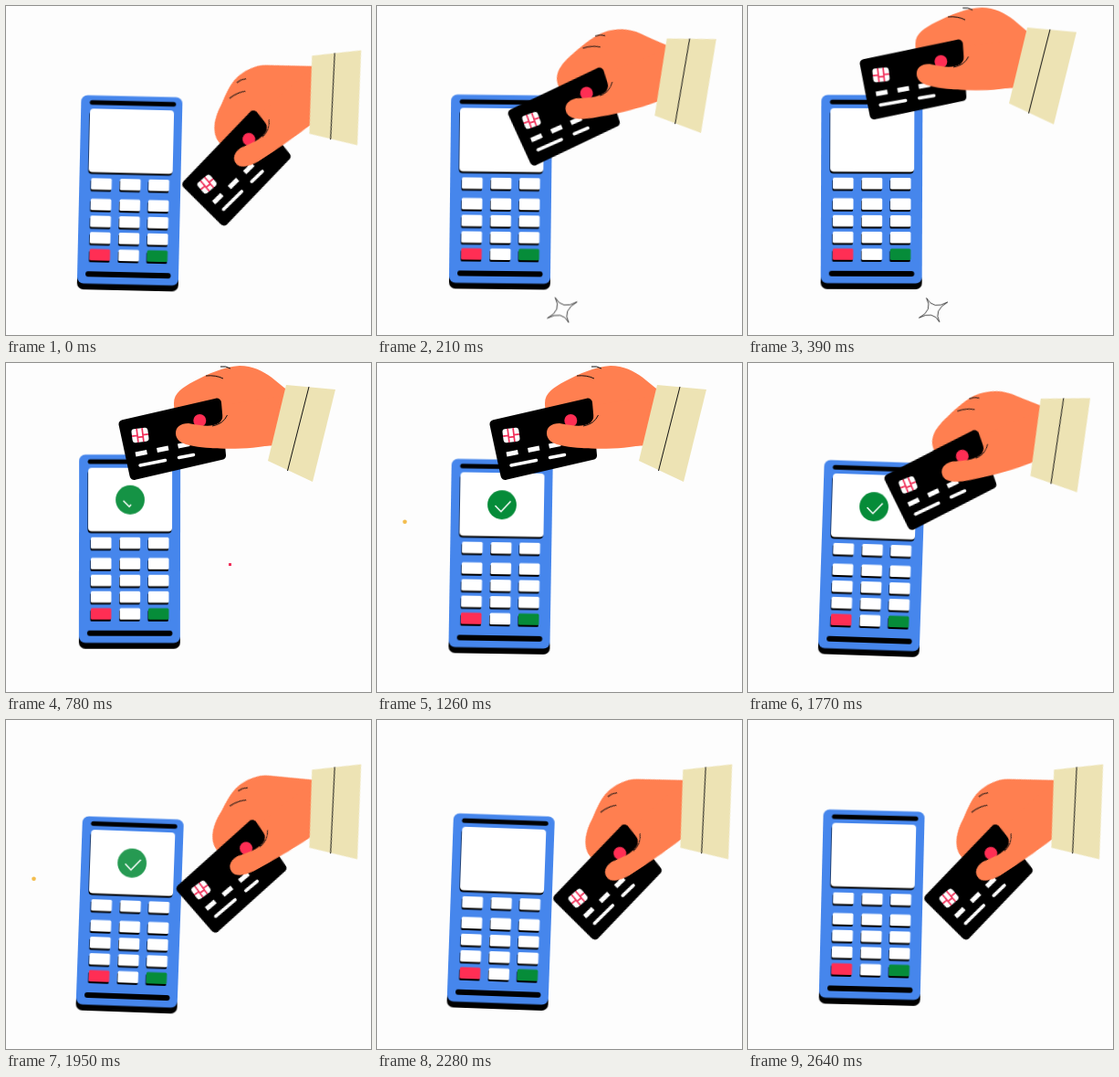
Recreate the animation shown at these times as an HTML page. Size 400 by 360 pixels, loop 2.67 s.

```html
<!DOCTYPE html>
<html lang="en">
<head>
<meta charset="utf-8">
<title>Card payment</title>
<style>
  html, body { margin: 0; width: 100%; height: 100%; overflow: hidden; background: #fdfdfd; }
  svg { display: block; width: 100%; height: 100%; }

  g, path, circle, rect {
    animation-duration: 2670ms;
    animation-iteration-count: infinite;
    animation-timing-function: cubic-bezier(.37, 0, .63, 1);
  }

  /* terminal: slow bob and sway, slightly out of phase */
  .bob { animation-name: bob; animation-delay: -2370ms; }
  .sway { animation-name: sway; animation-delay: -2070ms; transform-origin: 136px 210px; }
  @keyframes bob {
    0%, 100% { transform: translateY(-2.2px); animation-timing-function: cubic-bezier(.36, 0, .6, 1); }
    52.4% { transform: translateY(8.3px); animation-timing-function: cubic-bezier(.45, 0, .63, 1); }
  }
  @keyframes sway {
    0%, 100% { transform: rotate(0deg); }
    52.4%, 61.8% { transform: rotate(2.05deg); }
  }

  /* approval mark */
  .ok { animation-name: ok; }
  .tick { stroke-dasharray: 1 2; animation-name: tick; }
  @keyframes ok {
    0%, 22.5% { opacity: 0; }
    30.5%, 71% { opacity: 1; }
    80%, 100% { opacity: 0; }
  }
  @keyframes tick {
    0%, 24% { stroke-dashoffset: 1.1; }
    34%, 100% { stroke-dashoffset: 0; }
  }

  /* arm */
  .sleeve { animation-name: sleeve; transform-origin: 322.75px 72.5px; }
  .hand { animation-name: hand; transform-origin: 298px 66px; }
  .palm { animation-name: palm; }
  .thumb { animation-name: thumb; }
  @keyframes sleeve {
    0%, 73%, 100% { transform: translate(37.75px, 26.25px) rotate(-11.6deg); }
    14%, 59.5% { transform: translate(-1px, -.5px); }
    28%, 48% { transform: none; }
  }
  @keyframes hand {
    0%, 85%, 100% { transform: translate(41.5px, 35.4px) rotate(-33.2deg); }
    14%, 59.5% { transform: translate(-1px, -.5px) rotate(1.2deg); }
    28%, 48% { transform: translate(0, 0) rotate(0deg); }
    73% { transform: translate(41.5px, 35.4px) rotate(-29deg); }
  }
  @keyframes palm {
    0%, 73%, 100% { d: path("M320 38C304 27 288 16 272 5C263 -1 248 -3 235 0C227 2 218 8 209 14C198 20 184 30 183 45C183 52 187 60 192 66L260 86L300 84Z"); }
    14%, 59.5% { d: path("M318 36C309 31 300 23 291 15.7C282 9 270 3 256 3C238 4 222 12 206 20C193 27 184 33 184 44C184 52 186 60 192 66L260 92L300 90Z"); }
  }
  @keyframes thumb {
    0%, 73%, 100% { d: path("M186 77C186 70 191 66 200 66C212 68 224 71 233 66C239 62 238 54 239 46L312 35L300 84C270 89 230 89 208 89C194 88 186 84 186 77Z"); }
    14%, 59.5% { d: path("M186 77C186 70 191 66 200 66C212 68 224 71 233 66C239 62 238 54 239 46L300 36L292 89C270 95 230 95 206 91C192 89 186 84 186 77Z"); }
  }

  /* sparkles */
  .star { animation-name: star; }
  .red { animation-name: red; transform-origin: 245.5px 220.5px; }
  .gold { animation-name: gold; transform-origin: 30.5px 173.7px; }
  @keyframes star {
    0%, 3% { transform: scale(0); }
    11% { transform: scale(1.15); }
    20%, 100% { transform: scale(0); }
  }
  @keyframes red {
    0%, 25% { transform: scale(0); }
    28.5%, 30% { transform: scale(1); }
    34%, 100% { transform: scale(0); }
  }
  @keyframes gold {
    0%, 36%, 54%, 67%, 80%, 100% { transform: scale(0); }
    42%, 48%, 72%, 75% { transform: scale(1); }
  }
</style>
</head>
<body>
<svg viewBox="0 0 400 360">
  <g class="bob"><g class="sway">
    <rect x="80" y="106" width="111" height="206" rx="7"/>
    <rect x="80" y="99.5" width="111" height="206" rx="7" fill="#4686ec"/>
    <path d="M92 107.3H181.5" stroke="#000" stroke-width="5" stroke-linecap="round"/>
    <path d="M92 295H179.5" stroke="#000" stroke-width="6" stroke-linecap="round"/>
    <rect x="89.5" y="116.5" width="92" height="69" rx="4"/>
    <rect x="90" y="114" width="92" height="69.5" rx="4" fill="#fff"/>
    <g id="keys"></g>
    <g class="ok">
      <circle cx="136" cy="149" r="15.9" fill="#068c39"/>
      <path class="tick" pathLength="1" d="M128.5 150L135 156.5L145.5 145" fill="none" stroke="#fff" stroke-width="1.5"/>
    </g>
  </g></g>

  <g transform="translate(203 333)">
    <path class="star" d="M-10 -18Q0 0 21 -12Q0 0 9 17Q0 0 -21 11Q0 0 -10 -18Z" fill="none" stroke="#111"/>
  </g>
  <rect class="red" x="244" y="219" width="3" height="3" fill="#f0305a"/>
  <circle class="gold" cx="30.5" cy="173.7" r="2.3" fill="#f3bd4e"/>

  <g class="hand">
    <path class="palm" fill="#ff7f50" d="M318 36C309 31 300 23 291 15.7C282 9 270 3 256 3C238 4 222 12 206 20C193 27 184 33 184 44C184 52 186 60 192 66L260 92L300 90Z"/>
    <path d="M219 14Q230 13 238 17M235 4Q241 3 246 6" fill="none" stroke="#111"/>
    <path d="M128.5 67L140.5 123L236 101L231 43.5Z" stroke="#000" stroke-width="10" stroke-linejoin="round"/>
    <g transform="translate(147 79) rotate(-7)">
      <rect x="-9" y="-7.5" width="18" height="15" rx="3" fill="#fff"/>
      <path d="M-9 0H-3M3 0H9M-3 -7.5V7.5M3 -7.5V7.5M-3 2H3" stroke="#f0305a" stroke-width="1.7"/>
    </g>
    <circle cx="212.3" cy="63" r="7" fill="#ff2e54"/>
    <g stroke="#fff">
      <path d="M142 100L154.5 97.5M165.5 95.5L178 93M188.5 91L201 88.5" stroke-width="5"/>
      <path d="M147 112L174.5 106.5M189.5 103.5L205.5 100.5" stroke-width="3.5" stroke-linecap="round"/>
    </g>
    <path class="thumb" fill="#ff7f50" d="M186 77C186 70 191 66 200 66C212 68 224 71 233 66C239 62 238 54 239 46L300 36L292 89C270 95 230 95 206 91C192 89 186 84 186 77Z"/>
    <path d="M226 69Q238 67 242.5 57" fill="none" stroke="#111"/>
  </g>
  <g class="sleeve">
    <path d="M307 24L361 29L336 130L287 107Z" fill="#ede3b4"/>
    <path d="M332 26L308.5 118" stroke="#111"/>
  </g>
</svg>
<script>
  const keys = document.getElementById('keys');
  const addKey = (x, y, fill) => {
    const key = document.createElementNS(keys.namespaceURI, 'rect');
    const attrs = { x, y, width: 22.5, height: 12.5, rx: 1.5, fill };
    for (const name in attrs) key.setAttribute(name, attrs[name]);
    keys.append(key);
  };
  [190, 212.5, 231, 249, 267.5].forEach((y, row) => {
    [93, 124.7, 156].forEach((x, col) => {
      const fill = row < 4 ? '#fff' : ['#ff2e54', '#fff', '#068c39'][col];
      addKey(x - .5, y + 2, '#000');
      addKey(x, y, fill);
    });
  });
</script>
</body>
</html>
```
